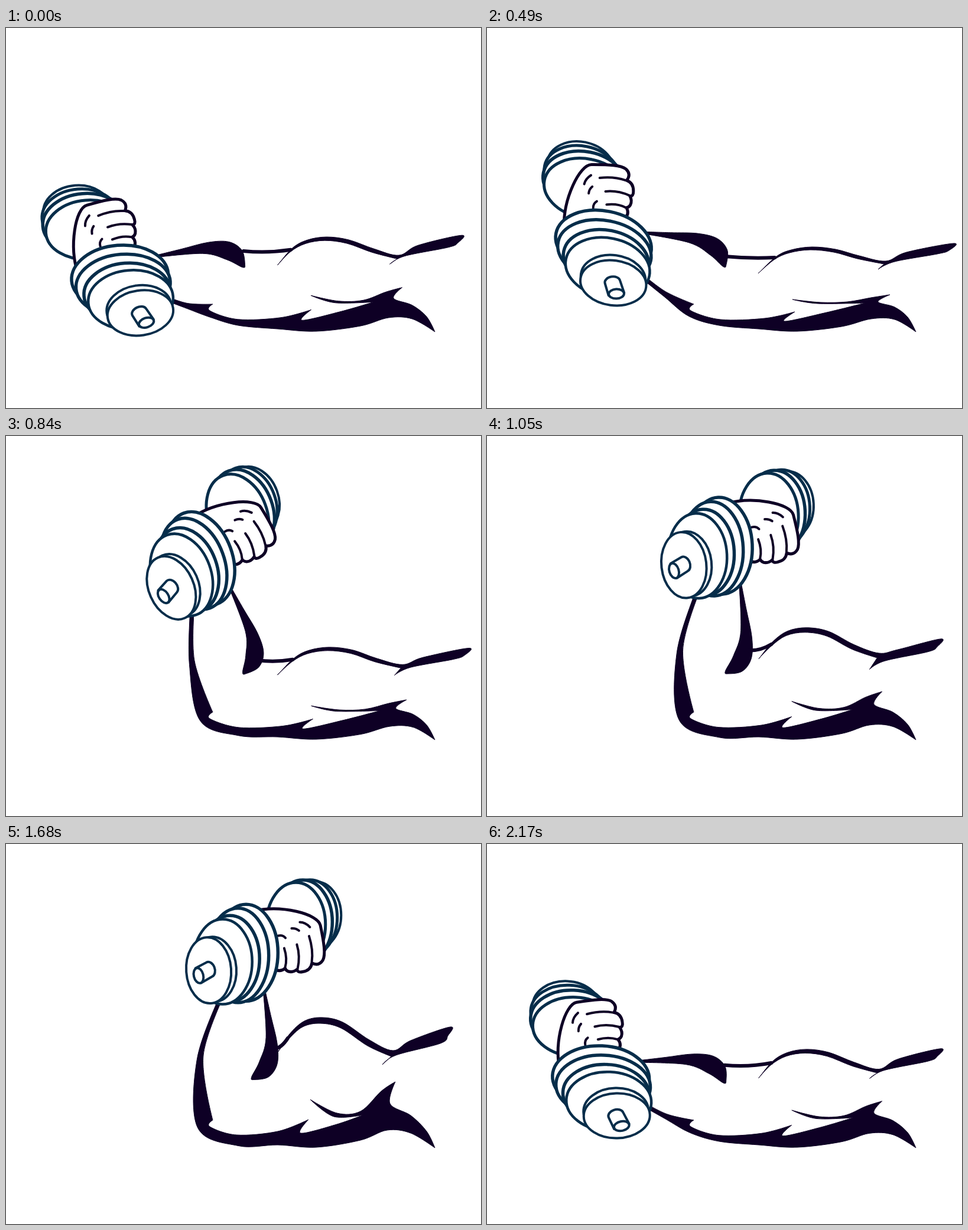
An HTML page with a canvas that plays this animation: 804x644 px, repeating every 2.24 s.

```html
<!DOCTYPE html>
<html lang="en">
<head>
<meta charset="utf-8">
<title>Dumbbell curl</title>
<style>
html, body { margin: 0; width: 100%; height: 100%; overflow: hidden; background: #fff; }
canvas { display: block; }
</style>
</head>
<body>
<canvas id="stage" width="804" height="644"></canvas>
<script>
const ctx = document.getElementById('stage').getContext('2d');
const INK = '#0e0025', STEEL = '#062d4a';
const STEP = 70, STEPS = 32, REACH = 100.5;

// Step, dumbbell turn in degrees, biceps flex, shoulder lift, shoulder pull
const keys = [
  [0, -100.5, 0.22, 0.25, 0.5],
  [2, -102.5, 0.14, 0.15, 0.4],
  [7, -84.5, 0, 0, 0],
  [8, -76.5, -0.02, -0.04, -0.2],
  [12, -26, 0.17, 0.1, 0.18],
  [16, -5, 0.75, 0.5, 0.7],
  [18, 0, 0.99, 0.75, 0.88],
  [20, 0.5, 1, 0.9, 0.95],
  [24, -6, 1, 1, 1],
  [27, -40, 0.76, 0.65, 0.9],
  [31, -93.5, 0.3, 0.33, 0.58]
];

// Muscle points: relaxed x, y and the shift when fully flexed
const biceps = [
  [490, 387, -10, -65], [515, 376, -10, -76], [550, 371, -15, -77],
  [590, 375, -20, -73], [630, 386, -15, -54], [675, 395, -20, -45]
];
const shoulder = [
  [710, 380, -25, -47], [790, 365, -38, -55], [782, 377, -34, -52],
  [762, 383, -27, -45], [690, 396, -30, -38], [662, 409, -25, -35]
];
const triceps = [
  [[460, 510], [525, 514], [600, 506, 0, -4], [650, 493, -5, -8], [690, 494, -5, -4], [726, 515]],
  [[712, 490, 0, -3], [690, 473, -5, -13], [662, 464, -12, -24], [682, 452, -23, -49]],
  [[650, 457, -15, -38], [610, 464, -10, -11], [565, 465, -5, -9], [517, 460, -2, -27]],
  [[560, 467, -5, -5], [640, 466, -35, -7]],
  [[575, 482, -15, -7], [504, 497, -5, -7], [521, 481, -9, -14]],
  [[470, 492, -10, -5], [395, 494, -5, -1]]
];

// Forearm bulge: share of the way from wrist to elbow, distance from that line
const bulge = [
  [0, 0], [0.3, 17], [0.58, 33], [0.8, 37.5], [0.95, 26],
  [1, 3], [0.98, -3], [0.8, 7], [0.53, 13], [0, -3]
];

function keyAt(i) {
  const n = keys.length, turn = Math.floor(i / n);
  const [step, ...v] = keys[i - turn * n];
  return { step: step + turn * STEPS, v };
}

// Slope that never overshoots a key
function slope(h0, d0, h1, d1) {
  if (d0 * d1 <= 0) return 0;
  const a = 2 * h1 + h0, b = h1 + 2 * h0;
  return (a + b) / (a / d0 + b / d1);
}

function sample(step) {
  const i = keys.findLastIndex(k => k[0] <= step);
  const [p, q, r, s] = [-1, 0, 1, 2].map(o => keyAt(i + o));
  const h0 = q.step - p.step, h = r.step - q.step, h1 = s.step - r.step;
  const u = (step - q.step) / h;
  return q.v.map((y, j) => {
    const d = (r.v[j] - y) / h;
    const m0 = slope(h0, (y - p.v[j]) / h0, h, d);
    const m1 = slope(h, d, h1, (s.v[j] - r.v[j]) / h1);
    const ease = u * u * (3 - 2 * u);
    return y + (r.v[j] - y) * ease + h * u * (1 - u) * (m0 * (1 - u) - m1 * u);
  });
}

function pose(step) {
  const [turn, flex, lift, pull] = sample(step);
  const bend = 1 + turn / REACH, angle = turn * Math.PI / 180;
  const x = 233 - 144 * bend + 268 * bend ** 2;
  const y = 491 - 312 * bend + 31 * bend ** 6;
  return { flex, lift, pull, bend, angle, x, y };
}

// Maps (share of a to b, distance to the left of that line) to the stage
function along([ax, ay], [bx, by]) {
  const dx = bx - ax, dy = by - ay, len = Math.hypot(dx, dy);
  return (s, n) => [ax + dx * s + dy / len * n, ay + dy * s - dx / len * n];
}

// Fills an outline of smooth runs that meet in sharp corners
function fillRuns(runs) {
  let last = runs[0][0];
  ctx.beginPath();
  ctx.moveTo(...last);
  for (const run of runs) {
    const pts = [last, ...run];
    const handle = (i, dir) => {
      const p = pts[i], a = pts[i - 1], b = pts[i + 1];
      return a && b ? p.map((c, k) => c + dir * (b[k] - a[k]) / 6) : p;
    };
    for (let i = 1; i < pts.length; i++) {
      ctx.bezierCurveTo(...handle(i - 1, 1), ...handle(i, -1), ...pts[i]);
    }
    last = pts[pts.length - 1];
  }
  ctx.closePath();
  ctx.fill();
  ctx.lineWidth = 1;
  ctx.stroke();
}

function drawArm({ flex, lift, pull, bend, angle, x, y }) {
  const cos = Math.cos(angle), sin = Math.sin(angle);
  const held = (dx, dy) => [x + dx * cos - dy * sin, y + dx * sin + dy * cos];
  const mix = (pts, w) => pts.map(([px, py, dx = 0, dy = 0]) => [px + dx * pull, py + dy * w]);
  ctx.fillStyle = ctx.strokeStyle = INK;

  const wrist = held(100, 35), crook = [404 + 14 * flex ** 4, 403 - 4 * flex ** 4];
  const onFore = along(wrist, crook);
  fillRuns([bulge.map(p => onFore(...p))]);

  const top = mix(biceps, flex);
  const under = top.map(([px, py]) => [px - 3, py + 5 + 5 * flex]).reverse();
  const back = mix(shoulder, lift), tick = [461 + flex, 414 - 64 * flex];
  fillRuns([[tick, ...top, ...back], under.slice(0, 1), [...under.slice(1), tick]]);

  // Fold between forearm and biceps
  const foldY = 387 - 41 * flex;
  const share = (foldY - wrist[1]) / (crook[1] - wrist[1]);
  const foldX = Math.max(402, wrist[0] + (crook[0] - wrist[0]) * share + 25);
  const [endX, endY] = under[under.length - 1];
  ctx.beginPath();
  ctx.moveTo(foldX, foldY);
  ctx.quadraticCurveTo((foldX + endX) / 2, foldY + 4, endX, endY - 3);
  ctx.lineWidth = 6;
  ctx.stroke();

  const outer = held(23, 40), inner = held(31, 40), nib = [350, 468];
  const elbow = [345 - 22 * bend, 490 - 10 * bend], bow = 24 * bend ** 3;
  const [belly, ...rest] = triceps.map(run => mix(run, lift));
  const last = rest.pop();
  fillRuns([
    [outer, along(outer, elbow)(0.5, -bow), elbow, [393, 504 + 9 * bend ** 3], ...belly],
    ...rest,
    [...last, [345, 479], nib],
    [along(inner, nib)(0.5, -6 - bow), inner]
  ]);
}

function disc(x, y, rx, ry, width, tilt = 6) {
  ctx.beginPath();
  ctx.ellipse(x, y, rx, ry, tilt * Math.PI / 180, 0, 7);
  ctx.fill();
  ctx.lineWidth = width;
  ctx.stroke();
}

const fist = new Path2D('M452 114C500 108 560 130 562 150C565 180 566 200 560 209Q552 219 541 212' +
  'Q538 224 524 225Q515 226 515 220Q508 225 500 222Q496 220 495 216Q485 223 475 214L452 200');
const folds = new Path2D('M541 166Q546 190 541 210M519 178Q523 198 516 219M497 182Q501 200 495 215' +
  'M489 160Q497 159 501 165M513 150Q520 150 525 155M528 141Q537 142 544 151');
const knob = new Path2D('M344 200L364 192A9 13 -12 0 1 371 217L351 226');

function drawDumbbell({ x, y, angle }) {
  ctx.save();
  ctx.translate(x, y);
  ctx.rotate(angle);
  ctx.translate(-357, -210);
  ctx.fillStyle = '#fff';

  ctx.strokeStyle = STEEL;
  disc(556, 132, 43, 57, 4);
  disc(546, 135, 46, 64, 5);
  disc(533, 141, 50, 71, 5.5);
  disc(521, 144, 50, 71, 5);

  ctx.strokeStyle = INK;
  ctx.fill(fist);
  ctx.lineWidth = 5;
  ctx.stroke(fist);
  ctx.lineWidth = 4;
  ctx.stroke(folds);

  ctx.strokeStyle = STEEL;
  disc(432, 183, 54, 82, 5.5);
  disc(418, 186, 52, 80, 5.5);
  disc(404, 190, 50, 73, 5.5);
  disc(391, 194, 50, 72, 4.5);
  disc(374, 205, 39, 55, 4, 2);
  disc(366, 206, 38, 56, 4, 2);
  ctx.lineWidth = 4;
  ctx.fill(knob);
  ctx.stroke(knob);
  disc(348, 213, 8, 13, 4, -8);
  ctx.restore();
}

const start = performance.now();
function tick() {
  const step = Math.floor((performance.now() - start) / STEP) % STEPS;
  const now = pose(step);
  ctx.clearRect(0, 0, 804, 644);
  ctx.lineCap = ctx.lineJoin = 'round';
  drawArm(now);
  drawDumbbell(now);
  requestAnimationFrame(tick);
}
tick();
</script>
</body>
</html>
```
